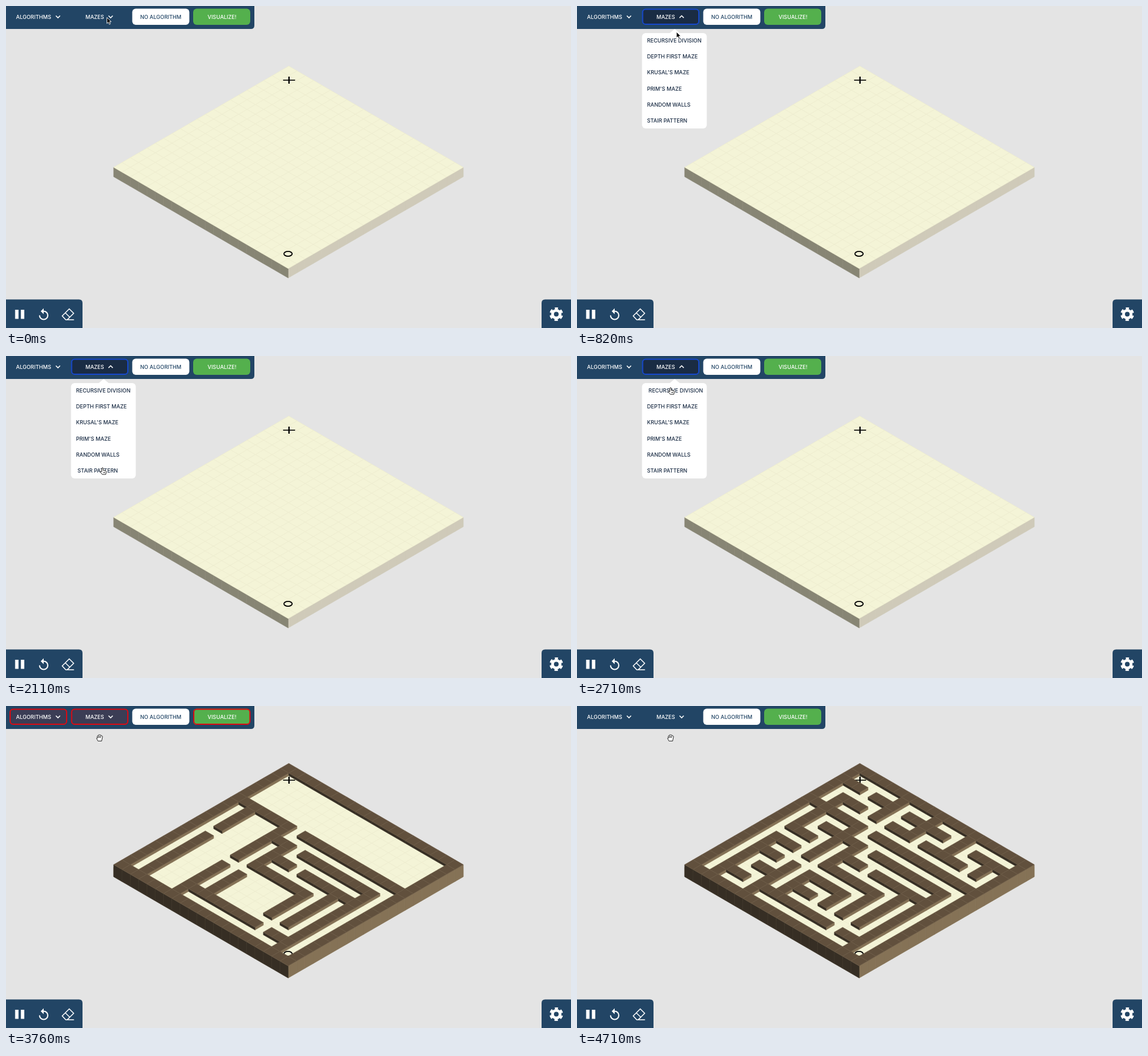
These frames come from a looping animation (960 by 547 pixels, 4.75 s). An HTML page with a canvas:

```html
<!DOCTYPE html>
<html lang="en">
<head>
<meta charset="utf-8">
<title>Maze generation</title>
<style>
  html, body { margin: 0; width: 100%; height: 100%; overflow: hidden; background: #e4e4e4; }
  canvas, svg { position: absolute; left: 0; top: 0; width: 960px; height: 547px; }
  text { font: 500 9px Inter, sans-serif; }
  .bar { fill: #224565; }
  .light { fill: #fff; }
  .line { fill: none; stroke: #fff; stroke-width: 1.5; }
  .red { fill: none; stroke: #dc0a12; stroke-width: 2; }
  #cursor path { stroke-width: .9; stroke-linejoin: round; }
  .hand { fill: #fff; stroke: #111; }
</style>
</head>
<body>
<canvas id="board" width="960" height="547"></canvas>
<svg viewBox="0 0 960 547">
  <path class="bar" d="M0 0H422V33q0 6-6 6H0zM0 498.500H124q6 0 6 6V547H0zM960 498.500H916q-6 0-6 6V547H960z"/>
  <g id="busyFill" fill="#3b3d55">
    <rect x="7" y="5" width="96" height="26.500" rx="5"/>
    <rect x="111" y="5" width="96" height="26.500" rx="5"/>
  </g>
  <rect id="active" x="111" y="5" width="96" height="26.500" rx="5" fill="#1a2c44"/>
  <rect id="focus" x="111.500" y="5.500" width="95.500" height="25.500" rx="5" fill="none" stroke="#1648cc" stroke-width="2"/>
  <rect class="light" x="214.500" y="4.500" width="97" height="27.500" rx="6"/>
  <rect x="318" y="4.500" width="97" height="27.500" rx="6" fill="#54b04d"/>
  <g id="busyLine" class="red">
    <rect x="7" y="5.500" width="96" height="25.500" rx="5"/>
    <rect x="111.500" y="5.500" width="95.500" height="25.500" rx="5"/>
    <rect x="319" y="5.500" width="95.500" height="25.500" rx="5"/>
  </g>
  <g class="light">
    <text x="17" y="21.500">ALGORITHMS</text>
    <text x="135" y="21.500">MAZES</text>
    <text x="367" y="21.500" text-anchor="middle">VISUALIZE!</text>
  </g>
  <text class="bar" x="263" y="21.500" text-anchor="middle">NO ALGORITHM</text>
  <path class="line" d="M84.700 16.500l3.600 3.600 3.600-3.600"/>
  <path class="line" id="chevron" d="M174.200 16.500l3.600 3.600 3.600-3.600"/>

  <path class="light" d="M15.500 516h5.800v15.500h-5.800zM25.300 516h5.800v15.500h-5.800z"/>
  <path class="light" transform="translate(52 512.500)" d="M12 5V1L7 6l5 5V7a6 6 0 1 1-6 6H4a8 8 0 1 0 8-8z"/>
  <path class="line" d="M95.500 526.500L107.500 514.500 115 522 104 533H101.500zM100.700 521.300L108.500 528.700M103 533H115.500"/>
  <g fill="none" stroke="#fff" transform="translate(935 523.500) rotate(-90)">
    <circle r="6.400" stroke-width="4.800"/>
    <circle r="9.800" stroke-width="3.600" stroke-dasharray="5.600 4.663" stroke-dashoffset="2.800"/>
  </g>

  <g id="menu">
    <path class="light" d="M157 46.500L166 39l9 7.500z"/>
    <rect class="light" x="110.500" y="46" width="110" height="162" rx="6"/>
    <g id="items" fill="#1a2c44"></g>
  </g>

  <g id="cursor">
    <path fill="#000" stroke="#fff" d="M0 0V10.200L2.400 8 4 11.700 5.800 10.900 4.200 7.300H7.400z"/>
    <path class="hand" d="M-1.200 6.500V1a1.200 1.200 0 0 1 2.400 0V4.200l4.300 1q1.200.400 1 1.800L5.500 11.200H-.500L-3.600 7.300q-.400-1.800 1.200-1.300zM2 9V7M3.800 9V7"/>
    <path class="hand" d="M-2.800 5.500L-5 1.200q-.300-1.700 1.400-.700L-4-2.700q.800-1.600 1.800-.200-.200-3 1.700-1.800 1.700-1.300 2.100.700 1.700-.900 1.900 1 1.500-.400 1.500 1.200L3.500 5.500zM-2-2.500V0M-.200-3V0M1.700-3V0"/>
  </g>
</svg>
<script>
const LOOP = 4750, OPEN = 450, PICK = 3435, DONE = 4450, SIZE = 21;
const $ = id => document.getElementById(id);
const clamp = v => Math.max(0, Math.min(1, v));
const ctx = $('board').getContext('2d');

// Each dividing wall is given by its opening; the odd coordinate runs along the wall.
const openings = [
  [7, 6], [6, 13], [2, 11], [18, 7], [9, 8], [15, 18], [8, 13], [11, 10], [16, 17], [15, 12], [14, 17],
  [13, 14], [12, 17], [11, 16],
  [3, 8], [5, 10], [5, 12], [5, 14], [3, 16], [5, 18],
  [6, 5], [3, 2], [2, 3], [5, 4], [10, 5], [7, 2], [7, 4],
  [14, 5], [13, 2], [11, 4], [15, 2], [18, 5], [17, 4]
];

const floorLook = { height: 0, top: '#f4f4d7', grid: '#ecebcd', left: '#878574', leftGrid: '#8b8978', right: '#cfcab9' };
const wallLook = { height: 4.5, top: '#61503d', grid: '#6a5946', left: '#362e24', leftGrid: '#40372c', right: '#857256' };

const point = (i, j, h) => [480.5 + 14.12 * i - 14.17 * j, 102 + 8.19 * (i + j) - h];

function quad(corners, fill, stroke) {
  ctx.beginPath();
  corners.forEach(c => ctx.lineTo(...point(...c)));
  ctx.closePath();
  ctx.fillStyle = fill;
  ctx.strokeStyle = stroke;
  ctx.lineWidth = .7;
  ctx.fill();
  ctx.stroke();
}

function cell(i, j, look, rightBase, leftBase) {
  const h = look.height, u = i + 1, v = j + 1;
  if (rightBase < h) quad([[u, j, h], [u, v, h], [u, v, rightBase], [u, j, rightBase]], look.right, look.right);
  if (leftBase < h) quad([[i, v, h], [u, v, h], [u, v, leftBase], [i, v, leftBase]], look.left, look.leftGrid);
  quad([[i, j, h], [u, j, h], [u, v, h], [i, v, h]], look.top, look.grid);
}

function eachCell(visit) {
  for (let i = 0; i < SIZE; i++) for (let j = 0; j < SIZE; j++) visit(i, j);
}

function buildWalls(count) {
  const walls = new Set();
  const key = (i, j) => i * SIZE + j;
  eachCell((i, j) => { if (i % 20 === 0 || j % 20 === 0) walls.add(key(i, j)); });
  for (const [i, j] of openings.slice(0, count)) {
    const di = i % 2, dj = j % 2;
    for (const step of [-1, 1]) {
      let a = i + di * step, b = j + dj * step;
      while (!walls.has(key(a, b))) {
        walls.add(key(a, b));
        a += di * step;
        b += dj * step;
      }
    }
  }
  return (i, j) => walls.has(key(i, j));
}

function drawBoard(count) {
  ctx.clearRect(0, 0, 960, 547);
  const base = n => n === SIZE - 1 ? -16 : 0;
  eachCell((i, j) => cell(i, j, floorLook, base(i), base(j)));
  ctx.fillStyle = ctx.strokeStyle = '#000';
  ctx.fillRect(470.8, 125.2, 20.4, 1.6);
  ctx.fillRect(479.7, 120, 2.3, 12);
  ctx.lineWidth = 1.8;
  ctx.beginPath();
  ctx.ellipse(479.2, 421, 7, 4.1, 0, 0, 7);
  ctx.stroke();
  if (count < 0) return;
  const isWall = buildWalls(count);
  const faceBase = (n, i, j) => base(n) || (isWall(i, j) ? wallLook.height : 0);
  eachCell((i, j) => {
    if (isWall(i, j)) cell(i, j, wallLook, faceBase(i, i + 1, j), faceBase(j, i, j + 1));
  });
}

const rowTop = 45.5, rowHeight = 27.1;
const items = ['RECURSIVE DIVISION', 'DEPTH FIRST MAZE', "KRUSAL'S MAZE", "PRIM'S MAZE", 'RANDOM WALLS', 'STAIR PATTERN']
  .map((label, k) => {
    const text = document.createElementNS('http://www.w3.org/2000/svg', 'text');
    text.textContent = label;
    text.setAttribute('y', 62.2 + rowHeight * k);
    return $('items').appendChild(text);
  });

// time, x, y
const track = [[0, 171.5, 19.5], [500, 171, 20], [820, 169, 44], [1080, 168, 60], [1430, 167.5, 62],
  [1510, 167, 77], [2000, 164, 190], [2120, 164, 190], [2600, 159, 56], [2710, 159, 54], [LOOP, 159, 54]];

function pointer(t) {
  const n = track.findIndex(k => k[0] > t);
  const [t0, x0, y0] = track[n - 1], [t1, x1, y1] = track[n];
  const p = (t - t0) / (t1 - t0);
  return [x0 + (x1 - x0) * p, y0 + (y1 - y0) * p];
}

const show = (el, on) => { el.style.opacity = +on; };
const hoveredRow = t => Math.floor((pointer(t)[1] - rowTop) / rowHeight);

let drawn;
function render(t) {
  const count = t < PICK ? -1 : Math.min(openings.length, Math.floor((t - PICK - 10) / 30) + 1);
  if (count !== drawn) drawBoard(drawn = count);

  const scale = Math.min(clamp((t - OPEN) / 150), clamp((PICK + 150 - t) / 150));
  const busy = t >= PICK && t < DONE;
  $('menu').setAttribute('transform', `translate(0 ${39 * (1 - scale)}) scale(1 ${scale})`);
  show($('menu'), scale > 0);
  show($('busyFill'), busy);
  show($('busyLine'), busy);
  show($('focus'), t >= OPEN && t < PICK);
  show($('active'), t < OPEN ? 0 : clamp((PICK + 200 - t) / 150));
  $('chevron').setAttribute('transform', scale > 0 ? 'matrix(1 0 0 -1 0 36.6)' : '');

  items.forEach((item, k) => {
    const hover = t < OPEN ? 0 : [40, 80, 120].filter(lag => hoveredRow(t - lag) === k).length / 3;
    item.setAttribute('x', 119 + 2.6 * hover);
  });

  const [x, y] = pointer(t);
  const shape = t >= PICK ? 2 : y > 46 ? 1 : 0;
  $('cursor').setAttribute('transform', `translate(${x} ${y})`);
  [...$('cursor').children].forEach((el, k) => show(el, k === shape));
}

function tick() {
  render(performance.now() % LOOP);
  requestAnimationFrame(tick);
}
tick();
</script>
</body>
</html>
```
